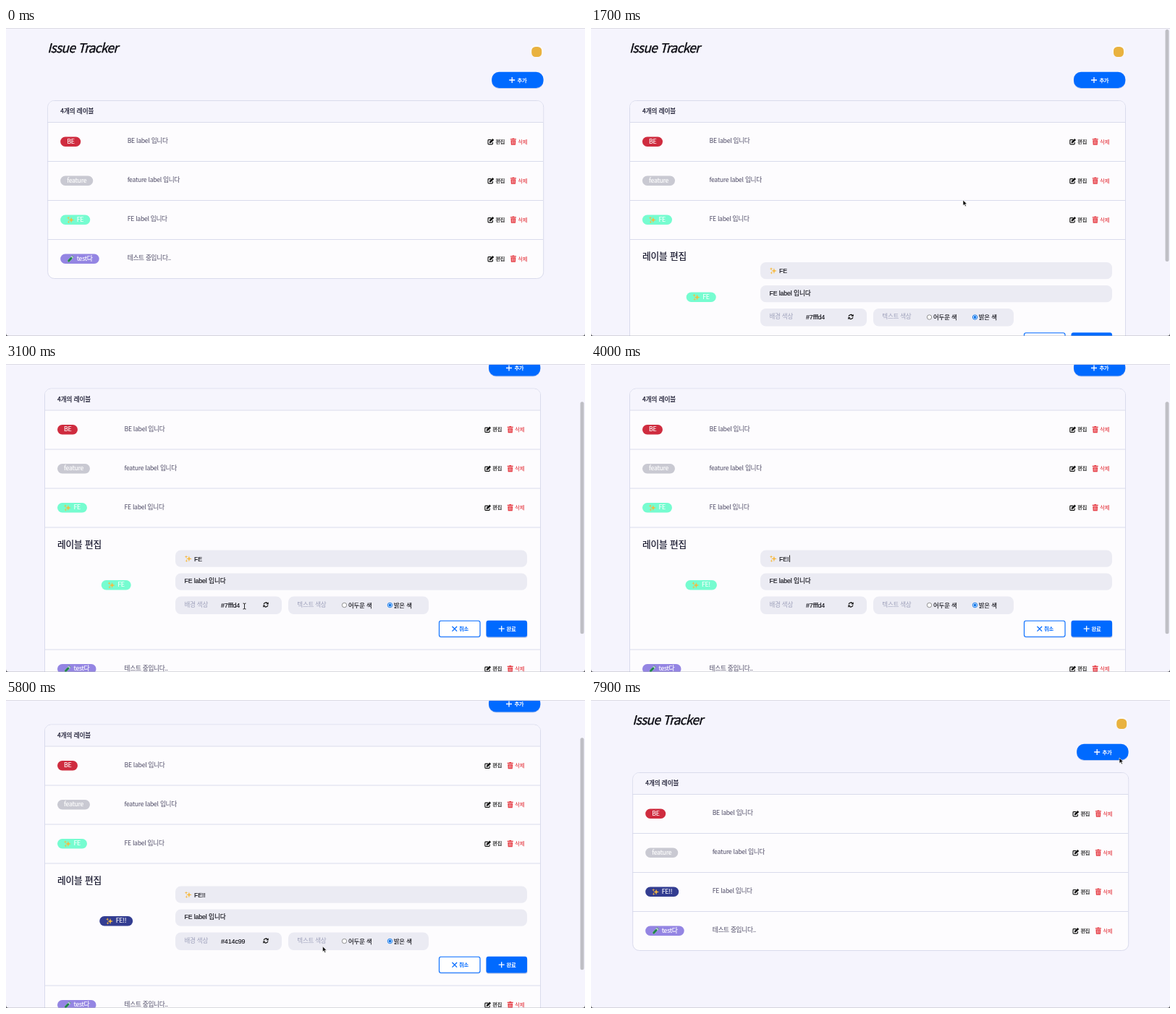
Animation, 800 px wide and 426 px high, one loop 8000 ms. Source, as an HTML page:

```html
<!DOCTYPE html>
<html lang="ko">
<head>
<meta charset="utf-8">
<title>Issue Tracker</title>
<style>
html, body { margin: 0; width: 100%; height: 100%; overflow: hidden; background: #f5f4fd; }
svg { display: block; width: 800px; height: 426px; }
text { font-family: "Noto Sans CJK KR", "Noto Sans CJK", "Noto Sans CJK JP", sans-serif; white-space: pre; letter-spacing: -.035em; }
.title { letter-spacing: -.047em; font-style: italic; }
.head { letter-spacing: -.01em; }
.field { font-family: "Liberation Sans", "Noto Sans CJK KR", "Noto Sans CJK", sans-serif; letter-spacing: -.01em; }
</style>
</head>
<body>
<svg id="stage" viewBox="0 0 800 426" xmlns="http://www.w3.org/2000/svg"></svg>
<script>
const LOOP = 8000, OPEN = 1100, SAVE = 6950, RECOLOR = 5400;
const BLUE = '#006aff', DARK = '#0046dd', RED = '#e5343d', INK = '#14142b';
const BODY = '#4e4b66', LINE = '#d9dbec', MINT = '#76fcd0', NAVY = '#333d91';

const stage = document.getElementById('stage');
function el(parent, name, attrs = {}, content) {
  const node = document.createElementNS('http://www.w3.org/2000/svg', name);
  set(node, attrs);
  if (content !== undefined) node.textContent = content;
  parent.appendChild(node);
  return node;
}
function set(node, attrs) {
  for (const key in attrs) node.setAttribute(key, attrs[key]);
}
const group = (parent, x = 0, y = 0) => el(parent, 'g', { transform: `translate(${x} ${y})` });
const show = (node, on) => node.setAttribute('display', on ? 'inline' : 'none');
const box = (parent, x, y, width, height, rx, fill, more) =>
  el(parent, 'rect', { x, y, width, height, rx, fill, ...more });
const text = (parent, x, y, size, fill, str, more) =>
  el(parent, 'text', { x, y, 'font-size': size, fill, ...more }, str);
const path = (parent, d, more) => el(parent, 'path', { d, ...more });
const medium = (color, width = .22) => ({ stroke: color, 'stroke-width': width });

// Icons, each drawn around its own centre
function plus(parent, x, y, color) {
  path(group(parent, x, y), 'M-4 0H4M0-4V4', { stroke: color, 'stroke-width': 1.3 });
}
function sparkle(parent, x, y) {
  const g = group(parent, x, y);
  const star = (cx, cy, r) => {
    const k = r * .24;
    path(g, `M${cx} ${cy - r}l${k} ${r - k}l${r - k} ${k}l${k - r} ${k}l${-k} ${r - k}l${-k} ${k - r}l${k - r} ${-k}l${r - k} ${-k}z`,
      { fill: '#f6b93f' });
  };
  star(.9, .2, 4);
  star(-3, -2.6, 2.2);
  star(-2.6, 3, 2);
}
function tube(parent, x, y) {
  const g = group(parent, x, y);
  set(g, { transform: `translate(${x} ${y}) rotate(42)` });
  box(g, -1.7, -5, 3.4, 10.4, 1.6, '#b9d5cf');
  box(g, -1.5, -2.6, 3, 7.8, 1.5, '#21844a');
  box(g, -2.2, -5.4, 4.4, 1.2, .5, '#6f9b94');
}
function pencil(parent, x, y) {
  const g = group(parent, x, y);
  set(g, { transform: `translate(${x} ${y}) scale(.92)` });
  path(g, 'M.8-2.8H-3Q-4-2.8-4-1.8V3Q-4 4-3 4H2Q3 4 3 3V.8', { fill: 'none', stroke: '#111', 'stroke-width': 1.2 });
  path(g, 'M-2 2.2L-1.7.1L3-4.5L5-2.5L.3 2z', { fill: '#111' });
}
function trash(parent, x, y) {
  const g = group(parent, x, y);
  path(g, 'M-4-3.9H-1.6L-1-4.6H1L1.6-3.9H4V-2.7H-4zM-3.4-2H3.4L3 4.6H-3z', { fill: RED });
  path(g, 'M-1.5-.9V3.5M0-.9V3.5M1.5-.9V3.5', { stroke: '#fff', 'stroke-width': .55 });
}
function refresh(parent, x, y) {
  const g = group(parent, x, y);
  path(g, 'M-2.9-.7A3 3 0 0 1 2.4-1.8M2.9.7A3 3 0 0 1-2.4 1.8', { fill: 'none', stroke: '#111', 'stroke-width': 1.3 });
  path(g, 'M3.7-3.7V-.6H.6zM-3.7 3.7V.6H-.6z', { fill: '#111' });
}

// A label pill with an optional emoji
function pill(parent, x, y, width, fill, str, icon) {
  const g = group(parent, x, y);
  const back = box(g, 0, -6.7, width, 13.3, 6.6, fill);
  if (icon) icon(g, 14, 0);
  const label = text(g, icon ? 22.5 : 9, 2.2, 8.8, '#fff', str, medium('#fff', .12));
  return { g, back, label };
}
function row(y, desc) {
  const g = group(page, 0, y);
  path(g, 'M53 .5H738', { stroke: LINE });
  text(g, 163.5, 29, 8.7, BODY, desc);
  pencil(g, 665.5, 27.2);
  text(g, 672.3, 29.5, 7.2, '#111', '편집', medium('#111', .15));
  trash(g, 696.7, 27.2);
  text(g, 703.3, 29.5, 7.2, RED, '삭제', medium(RED, .1));
  return g;
}

box(stage, 0, 0, 800, 426, 0, '#f5f4fd');
const page = group(stage);

text(page, 53, 34, 17.6, '#0b0b12', 'Issue Tracker', { class: 'title', ...medium('#0b0b12', .35) });
el(page, 'circle', { cx: 729, cy: 32, r: 9, fill: '#fbfaff' });
box(page, 722, 26, 14, 14, 5.5, '#e9b23f');
box(page, 667, 61.5, 71.3, 22.5, 10, '#b9c9ee');
box(page, 667, 60.7, 71.3, 22.3, 10, BLUE);
plus(page, 695, 72, '#fff');
text(page, 702.4, 74.6, 7.3, '#fff', '추가', { 'font-weight': 700 });

const table = box(page, 53.5, 100.5, 685, 246, 9, '#fdfcfe', { stroke: LINE });
path(page, 'M54 130V110Q54 101 63 101H729Q738 101 738 110V130z', { fill: '#f6f5fd' });
text(page, 71, 118, 8.6, INK, '4개의 레이블', { class: 'head', ...medium(INK) });

pill(row(130, 'BE label 입니다'), 71, 27.3, 28, '#cf2c3f', 'BE');
pill(row(184, 'feature label 입니다'), 71, 27.3, 45, '#c9c9d2', 'feature');
const feLabel = pill(row(238, 'FE label 입니다'), 71, 27.3, 41, MINT, 'FE', sparkle);
const lastRow = row(292, '테스트 중입니다..');
pill(lastRow, 71, 27.3, 53.5, '#9485e3', 'test다', tube);

// Edit form
const form = group(page);
path(form, 'M53 292.5H738', { stroke: LINE });
text(form, 71, 320, 12.7, INK, '레이블 편집', { class: 'head', ...medium(INK) });
const preview = pill(form, 132, 372.3, 41, MINT, 'FE', sparkle);
const GRAY = '#ebebf3';
box(form, 234, 324, 486, 23.3, 7.5, GRAY);
box(form, 234, 356, 486, 23.3, 7.5, GRAY);
box(form, 234, 388, 147, 24.5, 7.5, GRAY);
box(form, 390, 388, 194, 24.5, 7.5, GRAY);
sparkle(form, 252, 335.7);
const field = (x, y, str, size = 8.7) => text(form, x, y, size, '#0b0b12', str, { class: 'field', ...medium('#0b0b12', .12) });
const nameField = field(260, 339, 'FE');
field(246.5, 369.7, 'FE label 입니다');
text(form, 246.5, 402, 8.6, '#a0a3bd', '배경 색상');
const hexField = field(297, 403, '#7fffd4', 8.9);
refresh(form, 359, 399.5);
text(form, 402.3, 402, 8.6, '#a0a3bd', '텍스트 색상');
el(form, 'circle', { cx: 467.5, cy: 400, r: 3.2, fill: '#fff', stroke: '#777', 'stroke-width': .8 });
field(473, 403, '어두운 색', 8.4);
el(form, 'circle', { cx: 530.5, cy: 400, r: 3.2, fill: '#fff', stroke: '#0b74ea', 'stroke-width': 1 });
el(form, 'circle', { cx: 530.5, cy: 400, r: 1.9, fill: '#0b74ea' });
field(535.7, 403, '밝은 색', 8.4);
const caret = path(form, 'M0 331V340.5', { stroke: '#111', 'stroke-width': .9 });

box(form, 598, 422.5, 57.5, 22.5, 3, '#c7d6f4');
box(form, 598.5, 421.8, 56.5, 22, 2.5, '#fff', { stroke: BLUE, 'stroke-width': 1.1 });
path(form, 'M616.5 429.5l6.6 6.6m0-6.6l-6.6 6.6', { stroke: BLUE, 'stroke-width': 1.3 });
text(form, 626, 435.3, 7.3, BLUE, '취소', { 'font-weight': 700 });
box(form, 663.5, 423, 57, 22.3, 3, '#c3cbe6');
const done = box(form, 663.5, 421.3, 56.5, 22.7, 3, BLUE);
plus(form, 684.7, 432.7, '#fff');
text(form, 691.5, 435.3, 7.3, '#fff', '완료', { 'font-weight': 700 });

// Window edges and scrollbar
const thumb = box(stage, 793.5, 2, 5, 321, 2.5, '#bfbfc5');
path(stage, 'M0 .5H800', { stroke: '#dcdbe4' });
path(stage, 'M0 425.7H800', { stroke: '#b4b4bd', 'stroke-width': .6 });
path(stage, 'M0 422Q0 426 4 426H0zM800 422Q800 426 796 426H800z', { fill: '#55555c' });

// Mouse cursors, hot spot at the origin
const cursor = {
  arrow: group(stage), beam: group(stage), hand: group(stage)
};
path(cursor.arrow, 'M0 0V7.6L1.8 6L3 8.8L4.4 8.2L3.2 5.5H5.6z', { fill: '#111', stroke: '#fff', 'stroke-width': .6 });
path(cursor.beam, 'M-2-4Q0-4 0-3Q0-4 2-4M0-3V3M-2 4Q0 4 0 3Q0 4 2 4', { fill: 'none', stroke: '#111', 'stroke-width': .9 });
path(cursor.hand, 'M-.8 0Q0-1 .8 0V3L3.6 3.6Q4.4 4 4.2 5.2L3.4 8.6H-1L-3 5.4Q-2.8 4.2-1.6 5L-.8 5.6z',
  { fill: '#fff', stroke: '#111', 'stroke-width': .8 });

// Pointer stops: time, x, y
const stops = [
  [100, 745, 420], [800, 672, 266], [1150, 670, 266], [1700, 514, 238], [1900, 500, 246],
  [2400, 329, 335], [3100, 329.5, 335], [3300, 329.5, 335], [3550, 300, 270], [3800, 300, 270],
  [4700, 696, 367], [5150, 360, 333], [5600, 360, 333], [6250, 700, 367], [7100, 700, 367],
  [7400, 706, 322], [7800, 730, 80], [8000, 730, 80]
];
const clamp = v => Math.min(1, Math.max(0, v));
const smooth = v => { v = clamp(v); return v * v * (3 - 2 * v); };

function pointer(t) {
  let i = 0;
  while (i < stops.length - 2 && t >= stops[i + 1][0]) i++;
  const [t0, x0, y0] = stops[i], [t1, x1, y1] = stops[i + 1];
  const k = smooth((t - t0) / (t1 - t0));
  return [x0 + (x1 - x0) * k, y0 + (y1 - y0) * k];
}
function cursorKind(t) {
  if (t < 100 || (t >= 3800 && t < 4760)) return '';
  const beam = (t > 2200 && t < 3800);
  const hand = (t > 700 && t < 1200) || (t > 5080 && t < 5700) || (t > 6150 && t < 7050);
  return beam ? 'beam' : hand ? 'hand' : 'arrow';
}

function draw(t) {
  const editing = t >= OPEN && t < SAVE;
  const saved = t >= SAVE;
  const scroll = !editing || t < 2850 ? 0 : t < 3000 ? 5.5 + 45 * smooth((t - 2920) / 100) : 50.5 + 16 * clamp((t - 3000) / 80);
  set(page, { transform: `translate(${editing ? 0 : 4.2} ${-scroll})` });
  set(table, { height: editing ? 415 : 246 });
  set(lastRow, { transform: `translate(0 ${editing ? 461 : 292})` });
  show(form, editing);
  show(thumb, editing);
  set(thumb, { y: 2 + scroll * .755 });

  const marks = t < 4000 ? '' : t < 4250 ? '!' : '!!';
  const name = 'FE' + marks;
  const recolored = t >= RECOLOR;
  const width = 41 + marks.length * 2.5;
  nameField.textContent = name;
  preview.label.textContent = name;
  set(preview.g, { transform: `translate(${152.2 - width / 2} 372.3)` });
  set(preview.back, { width, fill: recolored ? NAVY : MINT });
  hexField.textContent = recolored ? '#414c99' : '#7fffd4';
  feLabel.label.textContent = saved ? 'FE!!' : 'FE';
  set(feLabel.back, { width: saved ? 46 : 41, fill: saved ? NAVY : MINT });

  const typing = t >= 4000 && t < 4800;
  const blink = (t - 2400) % 1000 < 550;
  show(caret, t >= 2400 && t < RECOLOR && (typing || blink));
  set(caret, { transform: `translate(${272 + marks.length * 2.5} 0)` });

  const hover = (t >= 4600 && t < 4860) || t >= 6150;
  set(done, { fill: hover ? DARK : BLUE });

  const kind = cursorKind(t), [x, y] = pointer(t);
  for (const key in cursor) {
    show(cursor[key], key === kind);
    set(cursor[key], { transform: `translate(${x} ${y})` });
  }
}

function tick(now) {
  draw(now % LOOP);
  requestAnimationFrame(tick);
}
draw(0);
requestAnimationFrame(tick);
</script>
</body>
</html>
```
